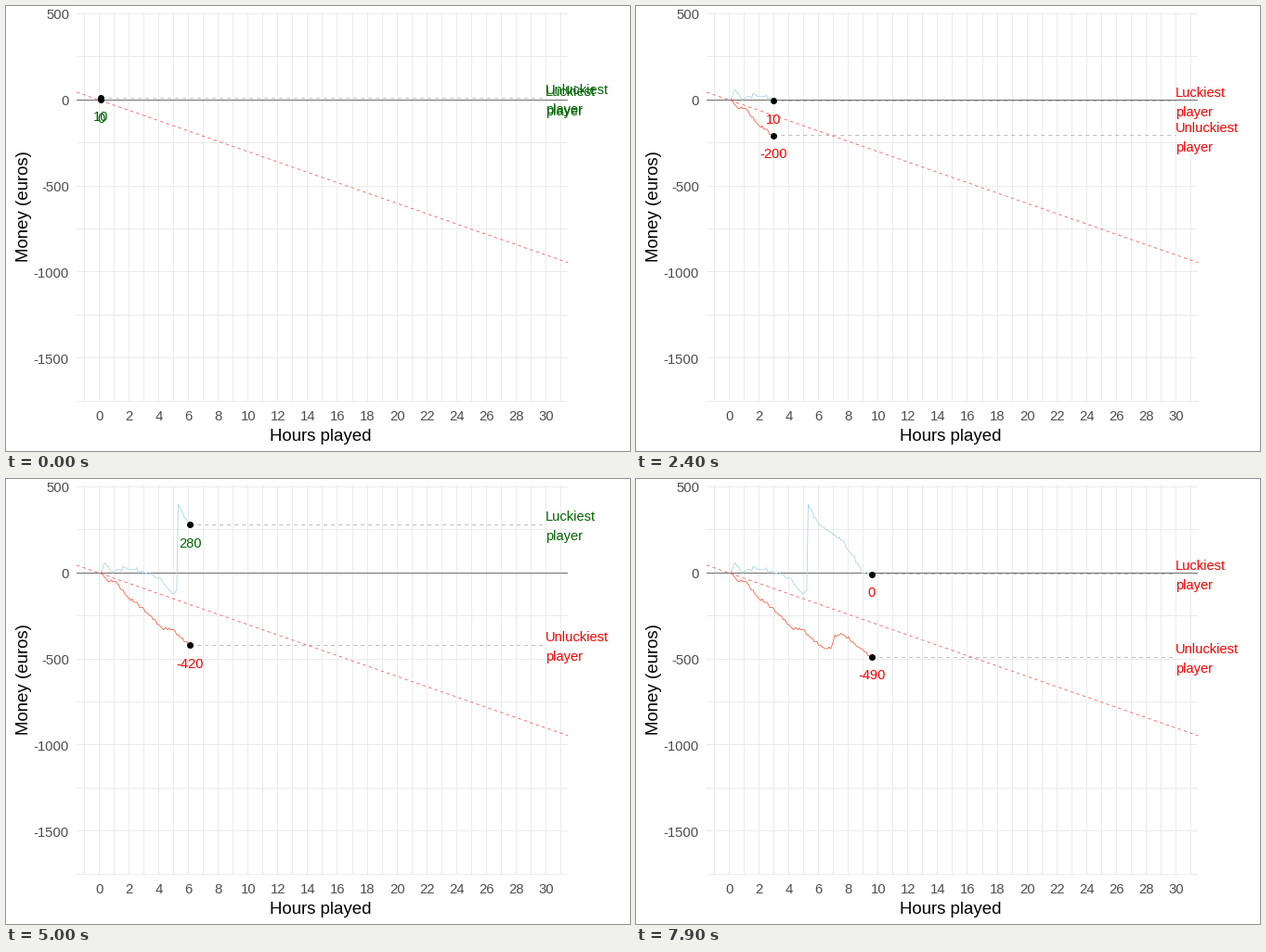
Animation, 672 px wide and 480 px high, one loop 8000 ms. Source, as a matplotlib script:

```python
import numpy as np
import matplotlib.pyplot as plt
from matplotlib.animation import FuncAnimation

W, H, DPI = 672, 480, 100
PX = 72 / DPI
FRAMES, INTERVAL = 80, 100
LEFT, RIGHT, TOP, BOTTOM = 75.5, 604.5, 6.5, 426.5
GREEN, RED = "#006400", "#ff0000"
DASH = dict(linestyle=(0, (4, 4)), dash_capstyle="butt")
HOURS = np.arange(1, 97) / 10

# Key moments of each game: hours played, euros
LUCKY = [(.1, 0), (.4, 60), (.9, 0), (1.7, 30), (2.9, 10), (4.2, -40),
         (4.9, -120), (5.2, -100), (5.3, 400), (6.0, 280), (7.1, 220),
         (7.7, 180), (9.0, 0), (9.5, 0), (9.6, -10)]
UNLUCKY = [(.1, 10), (.6, -50), (1.1, -50), (1.7, -120), (2.9, -200),
           (4.2, -320), (4.9, -330), (6.0, -420), (6.8, -440), (7.1, -360),
           (7.7, -360), (9.5, -490)]

plt.rcParams["font.family"] = "Liberation Sans"


def px(hours):
    return 100.01 + 16.03 * np.asarray(hours)


def py(euros):
    return 100.85 - 0.1856 * np.asarray(euros)


def balance(keys, seed):
    """Walk through the key moments in steps of ten euros."""
    times, euros = np.transpose(keys)
    jitter = np.random.default_rng(seed).normal(0, 6, HOURS.size)
    jitter[np.isin(HOURS, times)] = 0
    return 10 * np.round((np.interp(HOURS, times, euros) + jitter) / 10)


# Whole coordinates are pixel centres
fig = plt.figure(figsize=(W / DPI, H / DPI), dpi=DPI, facecolor="white")
ax = fig.add_axes([0, 0, 1, 1])
ax.set_xlim(-0.5, W - 0.5)
ax.set_ylim(H - 0.5, -0.5)
ax.axis("off")


def line(x, y, color, z, width=1, **kw):
    return ax.plot(x, y, color=color, lw=width * PX, zorder=z, snap=False,
                   solid_capstyle="butt", **kw)[0]


def text(x, y, s, size, color="black", ha="center", va="baseline", **kw):
    return ax.text(x, y, s, fontsize=size * PX, color=color, ha=ha, va=va,
                   zorder=8, **kw)


def hline(v, color, z):
    line([LEFT, RIGHT], [np.round(py(v))] * 2, color, z)


for h in range(-1, 32):
    line([np.round(px(h))] * 2, [TOP, BOTTOM], "#ebebeb", 1)
for v in range(-1750, 501, 250):
    hline(v, "#ebebeb", 1)
for h in range(0, 31, 2):
    text(px(h), 446.5, str(h), 14.93, "#4d4d4d")
for v in range(-1500, 501, 500):
    text(67.5, py(v) + 5.9, str(v), 14.93, "#4d4d4d", ha="right")
text(338.7, 468.5, "Hours played", 18.67)
text(19, 216, "Money (euros)", 18.67, va="center", rotation=90)

hline(0, "#6e6e6e", 3)
line([LEFT, RIGHT], py([45, -945]), "#ff6060", 3, 0.85, **DASH)


class Player:
    def __init__(self, name, values, color):
        self.values = values
        self.path = line([], [], color, 4, 0.85)
        self.guide = line([], [], "#bebebe", 2, **DASH)
        self.dot = ax.plot([], [], "o", color="black", ms=7 * PX, mew=0,
                           zorder=6, snap=False)[0]
        self.amount = text(0, 0, "", 14.67)
        self.tags = [text(px(30) - 0.5, 0, s, 14.67, ha="left")
                     for s in (name, "player")]

    def show(self, hour):
        past = HOURS <= hour + 1e-9
        value = np.interp(hour, HOURS, self.values)
        x, y = px(hour), py(value)
        self.path.set_data(np.append(px(HOURS[past]), x),
                           np.append(py(self.values[past]), y))
        self.guide.set_data([x, px(30)], [np.round(y)] * 2)
        self.dot.set_data([x], [y])

        color = RED if value < 0 else GREEN
        self.amount.set_text(f"{int(self.values[past][-1])}")
        self.amount.set_position((x, y + 24.2))
        self.amount.set_color(color)
        for tag, dy in zip(self.tags, (-4.2, 16.8)):
            tag.set_y(y + dy)
            tag.set_color(color)


players = [Player("Luckiest", balance(LUCKY, 4), "#add8e6"),
           Player("Unluckiest", balance(UNLUCKY, 7), "#ff6347")]


def draw(i):
    for p in players:
        p.show(0.1 + 0.1199 * i)
    return []


anim = FuncAnimation(fig, draw, frames=FRAMES, interval=INTERVAL,
                     repeat=True, repeat_delay=0, blit=False)
plt.show()
```
